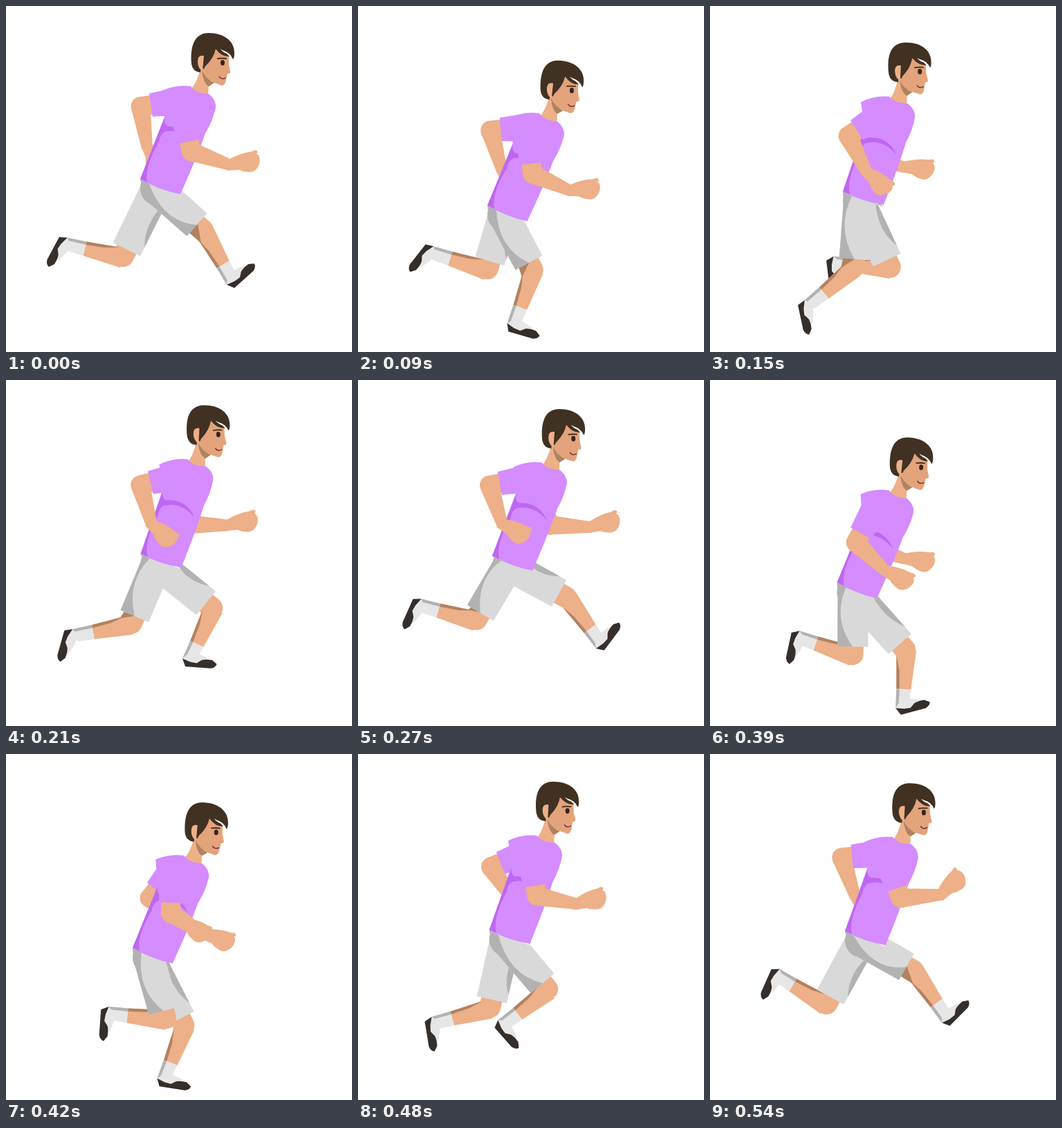
An HTML page with a canvas for the animation above (570 ms loop, 500 by 500 pixels).

```html
<!DOCTYPE html>
<html lang="en">
<head>
<meta charset="utf-8">
<title>Runner</title>
<style>
  html, body { margin: 0; height: 100%; overflow: hidden; background: #fff; }
  canvas { display: block; }
</style>
</head>
<body>
<canvas id="stage" width="500" height="500"></canvas>
<script>
const ctx = document.getElementById('stage').getContext('2d');
const SKIN = '#edb088', SKIN_SHADE = '#b08262', SHIRT = '#d48cff', SHIRT_SHADE = '#bf66f2';
const SHORTS = '#d9d9d9', SHORTS_SHADE = '#b2b2b2', SOCK = '#e6e6e6', SHOE = '#352e2b', HAIR = '#403122';
const STEPS = 18, STEP_MS = 30, LOOP_MS = 570;

// Pose keys on an 18-step cycle; angles in degrees, 0 = straight down, positive = forward.
const keys = [0, 2, 4, 8, 10, 13, 14, 17];
const body = [ // shirt back corner x, y, lean
  [194, 250, 0], [187, 288, 1], [192, 268, -2.6], [194, 254, -.6],
  [190, 293, -.4], [183, 280, .6], [186, 261, -1], [195, 256, -1.7]];
const nearLeg = [ // thigh angle, thigh length, shin angle, sole slope
  [48, 78, 30, -42], [27.5, 78, -19.5, 16], [-5, 84, -50, 78], [-31, 80, -105, 114],
  [-32, 81, -129, 117], [15, 80, -96, 94], [25, 84, -90, 88], [60, 75, 35, -45]];
const farLeg = [
  [-26.5, 98, -103, 118], [-17, 70, -107, 128], [25, 94, -95, 83], [61, 83, 36.5, -53],
  [55, 93, 21.5, -34], [27, 99, -21, 9], [4, 92, -43, 50], [-29, 93, -121, 114]];
const nearArm = [ // upper angle, upper length, forearm angle, hand angle
  [12, 75, 71, 100], [6, 68, 66, 95], [-57, 60, 27, 50], [-80, 63, 18, 63],
  [-92, 65, 20, 53], [-3, 63, 58, 73], [2, 64, 64, 82], [19, 69, 95, 135]];
const farArm = [
  [-82, 58, 9, 30], [-85, 54, 16, 30], [-23, 68, 75, 85], [20, 73, 87, 105],
  [28, 85, 101, 122], [-39, 53, 53, 62], [-55, 56, 42, 52], [-84, 63, 19, 35]];

// Periodic cubic interpolation over unevenly spaced keys.
function sample(track, step) {
  const n = keys.length;
  const time = i => keys[(i + n) % n] + STEPS * Math.floor(i / n);
  let i = n - 1;
  while (keys[i] > step) i--;
  const h = time(i + 1) - time(i), u = (step - time(i)) / h;
  return track[0].map((_, c) => {
    const value = k => track[(k + n) % n][c];
    const slope = k => (value(k + 1) - value(k)) / (time(k + 1) - time(k));
    const tangent = k => {
      const before = time(k) - time(k - 1), after = time(k + 1) - time(k);
      return (slope(k - 1) * after + slope(k) * before) / (before + after);
    };
    const a = value(i), b = value(i + 1);
    return a + (b - a) * u * u * (3 - 2 * u)
      + h * u * (1 - u) * ((1 - u) * tangent(i) - u * tangent(i + 1));
  });
}

const rad = deg => deg * Math.PI / 180;

// Point at a distance along a limb and to its front side.
function at([x, y], angle, along, side = 0) {
  const s = Math.sin(rad(angle)), c = Math.cos(rad(angle));
  return [x + s * along + c * side, y + c * along - s * side];
}

function poly(color, ...points) {
  ctx.fillStyle = color;
  ctx.beginPath();
  points.forEach(p => ctx.lineTo(...p));
  ctx.fill();
}

function shape(color, d) {
  ctx.fillStyle = color;
  ctx.fill(new Path2D(d));
}

function line(color, width, d) {
  ctx.strokeStyle = color;
  ctx.lineWidth = width;
  ctx.lineCap = 'round';
  ctx.stroke(new Path2D(d));
}

function placed([x, y], degrees, draw) {
  ctx.save();
  ctx.translate(x, y);
  ctx.rotate(rad(degrees));
  draw();
  ctx.restore();
}

function drawLeg(corner, [thigh, length, shin, sole], near) {
  const [x, y] = corner, hip = [x + 24, y + 14];
  const upper = (along, side) => at(hip, thigh, along, side);
  const knee = upper(length + 13, 0);
  const lower = (along, side) => at(knee, shin, along, side);

  line(SKIN, 31, `M${upper(length - 12, 0)}L${upper(length + 11, 0)}`);
  poly(SKIN, lower(-2, -14), lower(56, -10.5), lower(56, 10.5), lower(0, 15));
  if (near) poly(SKIN_SHADE, upper(length - 2, -16), upper(length - 2, 3), lower(14, -12));
  poly(SKIN_SHADE, lower(8, -13), lower(56, -10.5), lower(56, -6), lower(28, -8));

  const heel = lower(84, -10);
  poly(SOCK, lower(56, -10.5), heel, lower(86, 4), lower(79, 9), lower(56, 10.5));
  poly(SHORTS_SHADE, lower(56, -10.5), heel, lower(82, -6), lower(56, -6));
  placed(heel, sole, () => {
    shape(SOCK, 'M0 0L12 5L21 6L28 1L41 0L33-5L19-9L8-8Z');
    shape(SHOE, 'M0 0L5 11L42 11Q49 9 50 4L43-1Q34-2 28 0L21 5L12 4Z');
  });

  // Shorts
  const hemBack = upper(length, -22), hemFront = upper(length, 22);
  const outline = new Path2D(`M${corner}L${upper(0, -23)}L${hemBack}L${hemFront}L${upper(0, 22)}L${x + 58},${y + 22}Z`);
  const hipRound = new Path2D();
  hipRound.arc(...hip, 24, 0, 2 * Math.PI, true);
  outline.addPath(hipRound);
  ctx.fillStyle = SHORTS;
  ctx.fill(outline);
  ctx.save();
  ctx.clip(outline);
  if (near) {
    shape(SHORTS_SHADE, `M${x + 13},${y + 7}Q${upper(length / 2, -30)} ${upper(length, 0)}`
      + `L${upper(length + 5, -40)}L${upper(0, -50)}L${x - 10},${y - 5}Z`);
  } else {
    shape(SHORTS_SHADE, `M${upper(12, 20)}Q${upper(length * .55, 5)} ${upper(length * .88, 23)}L${upper(10, 30)}Z`);
  }
  ctx.restore();
}

function drawArm([x, y], [angle, length, fore, hand]) {
  const shoulder = [x + 58, y - 113];
  const upper = (along, side) => at(shoulder, angle, along, side);
  const elbow = upper(length, 0), hem = length - 15;
  const lower = (along, side) => at(elbow, fore, along, side);

  line(SKIN, 28, `M${upper(hem - 10, 0)}L${elbow}`);
  poly(SKIN, lower(0, -14), lower(61, -8), lower(61, 8), lower(0, 14));
  placed(lower(60, 0), 90 - hand, () => shape(SKIN,
    'M-6 7L-2-8Q18-15 34-14Q42-17 42-11L40-10Q46-4 41 6Q35 16 27 15Q16 13 12 9Z'));

  poly(SHIRT, upper(0, -20), upper(hem, -17), upper(hem, 17), upper(0, 21));
  ctx.beginPath();
  ctx.arc(...shoulder, 20, 0, 2 * Math.PI);
  ctx.fill();
}

function drawHead() {
  shape(SKIN, 'M283 88L275 108Q271 117 266 121L280 132L292 130L293 113L300 105Z');
  shape(SKIN_SHADE, 'M283 92Q289 106 301 111L293 116Q285 112 283 92Z');
  shape('#e3a37b', 'M284 74L303 58L322 73L322 85L324 94Q325 98 320 98L318 107Q317 114 312 115L301 111Q287 104 283 92Z');
  shape(HAIR, 'M281 96Q270 95 268 84C266 58 272 39 293 39C315 39 331 51 330 69Q330 75 328 77Q324 67 313 64L310 62'
    + 'Q312 66 319 69L323 73Q312 74 303 62Q300 76 288 87L286 91L282 89Z');
  shape(SKIN, 'M286 72Q277 70 277 80Q277 90 284 94Z');
  shape('#38251f', 'M310 82a3 4 0 1 1 6 0a3 4 0 1 1-6 0Z');
  line(HAIR, 1.8, 'M306 76Q312 75 318 76');
  line('#6b2433', 1.3, 'M308 102Q311 107 317 104');
}

function drawShirt() {
  shape(SHIRT, 'M194 250L229 160L226 122Q247 113 267 116Q275 127 293 127Q304 136 303 147'
    + 'Q299 166 288 184Q275 221 252 272Q221 266 194 250Z');
  shape(SHIRT_SHADE, 'M194 250L229 162Q228 172 234 174Q262 173 274 200Q254 176 229 182'
    + 'Q222 187 221 196Q199 234 204 255Z');
}

function drawRunner(step) {
  const [x, y, lean] = sample(body, step), corner = [x, y];
  const inTorso = draw => placed(corner, lean, () => { ctx.translate(-194, -250); draw(); });

  ctx.fillStyle = '#fff';
  ctx.fillRect(0, 0, 500, 500);
  drawArm(corner, sample(farArm, step));
  drawLeg(corner, sample(farLeg, step), false);
  drawLeg(corner, sample(nearLeg, step), true);
  inTorso(drawHead);
  inTorso(drawShirt);
  drawArm(corner, sample(nearArm, step));
}

// The first pose is held for two steps.
function tick() {
  const t = performance.now() % LOOP_MS;
  drawRunner(Math.max(0, Math.floor(t / STEP_MS) - 1));
  requestAnimationFrame(tick);
}
tick();
</script>
</body>
</html>
```
